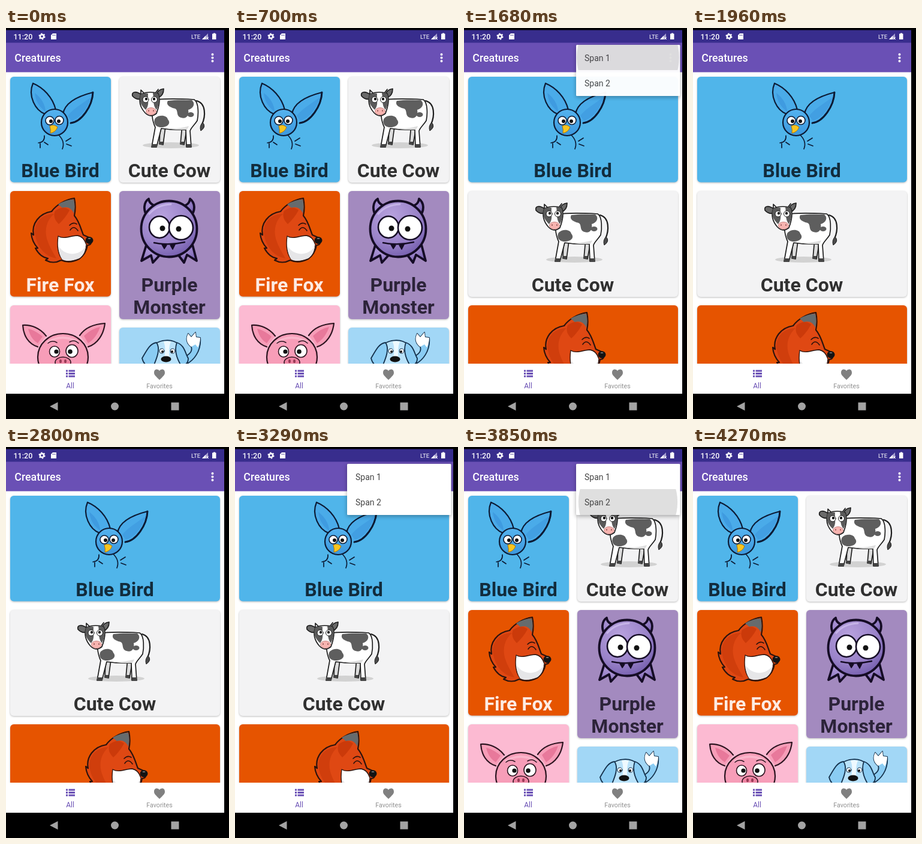
These frames come from a looping animation (372x650 px, 4.34 s). An HTML page:

```html
<!DOCTYPE html>
<html lang="en">
<head>
<meta charset="utf-8">
<style>
html, body { margin: 0; width: 100%; height: 100%; overflow: hidden; background: #000; }
svg { display: block; width: 372px; height: 650px; font-family: Roboto, sans-serif; }
.card { filter: drop-shadow(0 1px 1.5px #0004); }
.name { font-weight: 700; font-size: 32px; text-anchor: middle; }
.ink { stroke-linecap: round; stroke-linejoin: round; }
#menu { filter: drop-shadow(0 2px 3.5px #0005); font-size: 14px; fill: #444; }
</style>
</head>
<body>
<svg viewBox="0 0 372 650">
<defs>
  <clipPath id="listClip"><path d="M0 73H364V558H0z"/></clipPath>
  <clipPath id="item1"><path d="M187 28H361V70H187z"/></clipPath>
  <clipPath id="item2"><path d="M187 70H361V113H187z"/></clipPath>
  <radialGradient id="violet" cx=".38" cy=".28" r=".8"><stop stop-color="#b8a2de"/><stop offset=".6" stop-color="#9a83c9"/><stop offset="1" stop-color="#6f59aa"/></radialGradient>
  <linearGradient id="sky" x2="0" y2="1"><stop stop-color="#55b3ef"/><stop offset="1" stop-color="#3c98de"/></linearGradient>

  <g id="bird" class="ink" stroke="#0c1b35" stroke-width="2.200" fill="#4aabe9">
    <path d="M65 143C49 137 36 113 45 92C62 99 78 115 83 136"/>
    <path d="M48 108C49 122 57 133 66 139C66 128 58 115 48 108" fill="#3f9be0" stroke="none"/>
    <path d="M95 143C98 123 121 113 145 107C144 130 126 156 108 158"/>
    <path d="M103 146C110 136 125 127 142 115C136 135 123 150 109 154" fill="#429fe2" stroke="none"/>
    <path d="M145 107C144 130 126 156 108 158" fill="none" stroke-width="3"/>
    <path d="M64 179Q65 190 54 191M64 190L70 194M57 192L57 199M88 178Q99 189 94 201M100 188L108 183M101 193L109 196" fill="none" stroke-width="1.700"/>
    <circle cx="81" cy="157" r="22" fill="url(#sky)"/>
    <g stroke-width="1.600" fill="#fff"><circle cx="73" cy="154" r="7"/><circle cx="89" cy="153.500" r="7"/></g>
    <g fill="#111" stroke="none"><circle cx="75" cy="155" r="3"/><circle cx="88" cy="155" r="3"/></g>
    <path d="M73 163Q80 159 86 165Q83 173 74 175Q75 169 73 163z" fill="#f9c51d" stroke="#a87413" stroke-width="1"/>
  </g>

  <g id="cow" class="ink" stroke="#1d1d1d" stroke-width="1.700" fill="#fff">
    <ellipse cx="275" cy="195" rx="47" ry="5" fill="#d2d2d2" stroke="none"/>
    <path d="M318 121C334 125 333 147 327 160" fill="none" stroke-width="2.200"/>
    <path d="M328 157Q335 164 325 171Q322 163 328 157" fill="#4b4b4b" stroke-width="1"/>
    <path d="M257 162L256 193L262 194L266 164M294 160L291 193L297 194L302 166" fill="#ddd"/>
    <path d="M246 120C262 117 294 118 314 119C322 124 321 145 319 154C314 162 309 165 307 171L309 198L301 198L300 169Q278 170 259 167L251 198L243 198L249 165C243 153 242 136 246 120z"/>
    <path d="M259 165Q282 170 305 163Q303 169 300 169Q278 170 259 165z" fill="#dedede" stroke="none"/>
    <g fill="#5e5e5e" stroke="none">
      <path d="M270 121C284 119 299 120 310 120C317 126 312 134 304 136C306 146 300 152 292 149C283 147 288 136 282 134C274 132 266 128 270 121z"/>
      <path d="M249 150C256 143 269 145 270 152C277 160 266 166 257 165C248 164 245 156 249 150z"/>
      <ellipse cx="308" cy="144" rx="5.500" ry="4"/>
      <path d="M243 193h9v5h-9zM301 193h8v5h-8zM256 189h6v5h-6zM291 189h6v5h-6z" fill="#444"/>
    </g>
    <path d="M226 111C217 104 209 106 211 113Q217 120 226 118zM251 110Q254 102 263 101Q263 113 253 116z" fill="#6a6a6a"/>
    <path d="M225 110Q239 104 254 109C259 120 254 134 251 142Q241 150 232 141C224 132 221 121 225 110z"/>
    <path d="M225 110Q232 107 237 109C236 119 240 127 233 136C224 128 221 119 225 110zM245 108Q251 107 254 110C258 120 254 130 251 136C244 127 247 119 245 108z" fill="#5a5a5a" stroke="none"/>
    <path d="M225 109L225 103L230 108M250 107L254 102" fill="none"/>
    <g stroke-width="1"><circle cx="233" cy="119" r="5"/><circle cx="247.500" cy="119" r="5"/></g>
    <g fill="#111" stroke="none"><circle cx="234" cy="118" r="2.200"/><circle cx="247" cy="118" r="2.200"/></g>
    <ellipse cx="242" cy="138.500" rx="8.500" ry="6" fill="#f7b4b0" stroke="#c98a88" stroke-width="1"/>
    <path d="M238 137v1M246 137v1" stroke="#8a4e4c"/>
  </g>

  <g id="fox" class="ink" stroke="#2b130d" stroke-width="2.200">
    <path d="M76 305C84 294 99 285 114 283C116 293 116 303 114 312C122 321 125 334 129 344L138 348C145 353 143 361 136 361C134 372 129 379 122 384C110 390 99 389 92 386Q79 393 66 386L70 383Q57 381 49 366L53 366Q43 355 42 341L46 344C42 325 56 308 76 305z" fill="#df4813"/>
    <path d="M48 342C47 323 60 309 80 309C68 320 64 334 68 350C73 366 79 373 84 383C65 380 52 364 48 342z" fill="#d03e0c" stroke="none"/>
    <path d="M87 293Q101 285 113 285Q116 297 113 308Q107 295 94 299z" fill="#666b6d" stroke="none"/>
    <path d="M82 304Q96 294 106 303Q99 316 88 326Q77 315 82 304z" fill="#cb3a0a" stroke="none"/>
    <path d="M87 346C97 352 108 345 119 345C127 346 131 351 134 360C133 371 129 379 122 383C110 388 100 388 94 385C86 375 85 360 87 346z" fill="#fff" stroke-width="1.300"/>
    <path d="M88 363C98 379 122 380 133 363C132 373 128 379 122 383C110 388 100 388 94 385Q88 377 88 363z" fill="#e6e6e8" stroke="none"/>
    <path d="M107 336Q113 327 120 337M106 328Q112 322 118 326" fill="none" stroke-width="1.600"/>
    <ellipse cx="139" cy="353" rx="6.500" ry="6" fill="#131313" stroke="none"/>
    <ellipse cx="139" cy="350" rx="2.500" ry="1" fill="#777" stroke="none"/>
  </g>

  <g id="monster" class="ink" stroke="#150c25" stroke-width="3.800" fill="url(#violet)">
    <path d="M234 361L226 387L242 378L245 390L256 378M288 378L297 390L302 377L318 387L311 360"/>
    <path d="M236 313C228 303 230 289 238 284C239 293 247 296 256 297zM288 297C298 297 306 293 307 284C315 290 317 303 308 313z"/>
    <circle cx="272" cy="334" r="46.500"/>
    <path d="M239 309Q252 294 275 293" fill="none" stroke="#c6b4e8" stroke-width="3"/>
    <g fill="#fff" stroke-width="2.600"><ellipse cx="256" cy="331" rx="17" ry="18"/><circle cx="292" cy="332" r="20"/></g>
    <g fill="#111" stroke="none"><circle cx="261" cy="333" r="4.500"/><circle cx="288" cy="334" r="4.500"/></g>
    <path d="M247 357Q272 362 298 356" fill="none" stroke-width="2.400"/>
    <path d="M260 360L264 367L268 361zM274 361L278 368L282 360z" fill="#150c25" stroke-width="1.500"/>
  </g>

  <g id="pig" class="ink" stroke="#2c1420" stroke-width="2.200" fill="#f79db8">
    <path d="M67 512C57 499 42 493 28 494C29 511 37 525 53 530M123 511C132 498 148 492 165 491C163 509 153 525 137 530"/>
    <path d="M61 513Q48 502 37 500Q41 517 53 524zM130 512Q142 500 157 497Q151 515 137 524z" fill="#e8799b" stroke="none"/>
    <ellipse cx="95" cy="547" rx="42" ry="39"/>
    <path d="M70 522Q93 508 119 521" fill="none" stroke="#fbb6cb" stroke-width="4"/>
    <path d="M70 524Q77 518 85 523M106 522Q114 517 121 524" fill="none" stroke-width="1.500"/>
    <g fill="#fff" stroke-width="1.600"><ellipse cx="81" cy="538" rx="8.500" ry="9"/><ellipse cx="110" cy="537" rx="10" ry="10.500"/></g>
    <g fill="#111" stroke="none"><circle cx="84" cy="538" r="3.600"/><circle cx="107" cy="538" r="3.800"/></g>
    <ellipse cx="95" cy="556" rx="13" ry="9" fill="#ee84a2" stroke-width="1.600"/>
    <g fill="#983b57" stroke="none"><ellipse cx="91" cy="554" rx="2" ry="3"/><ellipse cx="99" cy="554" rx="2" ry="3"/></g>
  </g>

  <g id="dog" class="ink" stroke="#14304b" stroke-width="1.800" fill="#8accf3">
    <path d="M291 548C303 546 312 539 309 530C302 525 299 517 304 508L309 514L316 506L317 514L324 515C326 535 315 555 293 562"/>
    <path d="M309 530C302 525 299 517 304 508L309 514L316 506L317 514L324 515Q324 523 320 531L316 526z" fill="#fff" stroke="none"/>
    <path d="M249 525C261 517 279 517 288 526L293 565H242z" fill="#b9e2fa"/>
    <path d="M251 523C239 525 235 536 227 549Q231 565 246 562C252 548 258 533 251 523zM285 523C298 527 299 541 304 549Q304 561 292 561C284 548 281 534 285 523z"/>
    <path d="M263 521Q268 534 263 552H273Q270 534 275 521z" fill="#eef9ff" stroke="none"/>
    <g fill="#fff" stroke-width="1"><circle cx="260" cy="537" r="4"/><circle cx="278" cy="537" r="4"/></g>
    <g fill="#111" stroke="none"><circle cx="261" cy="538" r="2"/><circle cx="277" cy="538" r="2"/><ellipse cx="267" cy="550.500" rx="8.500" ry="5"/></g>
  </g>
</defs>

<path d="M0 4H364V608H0z" fill="#fff"/>
<g id="list" clip-path="url(#listClip)"></g>

<path d="M0 3.500H364V25H0z" fill="#382d8d"/>
<path d="M0 24.500H364V73.500H0z" fill="#6a50b5"/>
<g fill="#fff">
  <text x="12.500" y="18.700" font-size="12.500" font-weight="500">11:20</text>
  <circle cx="60" cy="14" r="3.100" fill="none" stroke="#fff" stroke-width="2.500"/>
  <circle cx="60" cy="14" r="4.800" fill="none" stroke="#fff" stroke-width="1.500" stroke-dasharray="2.500 2.527"/>
  <path d="M78 9H84V19H75V12z"/>
  <path d="M78 11v2M80 11v2M82 11v2" stroke="#382d8d" stroke-width=".8"/>
  <text x="309" y="17.500" font-size="9.800">LTE</text>
  <path d="M327 19L337 9V19z" fill="#a7a0d0"/><path d="M327 19L333 13V19z"/>
  <path d="M334 15l4 4m0-4l-4 4" stroke="#fff"/>
  <path d="M346 8.500h3v1h1.500v9.500h-6.500v-9.500h2z"/>
  <text x="14.300" y="56" font-size="17.800" font-weight="500">Creatures</text>
  <circle cx="344.500" cy="44" r="2"/><circle cx="344.500" cy="49.500" r="2"/><circle cx="344.500" cy="55" r="2"/>
</g>

<path d="M0 558H364V608H0z" fill="#fff"/>
<path d="M100 568.500h3v3h-3zm4.500 0H115v3h-10.500zM100 573h3v3h-3zm4.500 0H115v3h-10.500zM100 577.500h3v3h-3zm4.500 0H115v3h-10.500z" fill="#6a50b5"/>
<path d="M256 585C250 579 247 577 247 573C247 567 253 566 256 570C259 566 265 567 265 573C265 577 262 579 256 585z" fill="#808080"/>
<g text-anchor="middle">
  <text x="107" y="599" font-size="12" fill="#6d54b6">All</text>
  <text x="256" y="599" font-size="10.700" fill="#919191">Favorites</text>
</g>
<g fill="#a3a3a3"><path d="M73 629L86.500 622V636z"/><circle cx="181.500" cy="629" r="6.500"/><path d="M275.500 622.500h13v13h-13z"/></g>

<g id="menu">
  <rect x="187" y="28" width="173.500" height="85" rx="1.500" fill="#fff"/>
  <circle id="ripple" cx="273.500" fill="#dfdfdf"/>
  <text x="201" y="54.500">Span 1</text><text x="201" y="97">Span 2</text>
</g>
</svg>

<script>
const LOOP = 4340, STEP = 70;
const $ = id => document.getElementById(id);
const clamp = x => Math.max(0, Math.min(1, x));
const easeOut = x => 1 - (1 - clamp(x)) ** 2;

// id, label lines, card colour, text colour, x, y, height
const creatures = [
  ['bird', ['Blue Bird'], '#50b5ea', '#122c3d', 7, 81, 175.5],
  ['cow', ['Cute Cow'], '#f3f3f4', '#303030', 189, 81, 176],
  ['fox', ['Fire Fox'], '#e65400', '#fdebe3', 7, 271, 175.5],
  ['monster', ['Purple', 'Monster'], '#a38abf', '#2c2339', 189, 271, 213],
  ['pig', [], '#fcbad2', '#333', 7, 461, 176],
  ['dog', [], '#a2d7f6', '#333', 189, 498, 176]
];

function card([id, lines, fill, ink, x, y, h], newY) {
  const single = newY !== undefined;
  const top = single ? newY : y, left = single ? 7 : x, width = single ? 350 : 168;
  const mid = left + width / 2;
  const labels = lines.map((s, i) =>
    `<text class="name" x="${mid - .5}" y="${top + 166.5 + i * 37.5}" fill="${ink}">${s}</text>`);
  return `<rect class="card" x="${left}" y="${top}" width="${width}" height="${h}" rx="6" fill="${fill}"/>
    <use href="#${id}" x="${mid - x - 84}" y="${top - y}"/>${labels.join('')}`;
}

$('list').innerHTML =
  `<g id="grid">${creatures.map(c => card(c)).join('')}</g>
   <g id="column">${creatures.slice(0, 3).map((c, i) => card(c, 81 + i * 190)).join('')}</g>`;

const visits = [
  { open: 840, press: 1500, close: 1675, item: 1 },
  { open: 2870, press: 3685, close: 3870, item: 2 }
];

function draw(now) {
  const t = Math.floor(now % LOOP / STEP) * STEP;
  const single = t >= 1680 && t < 3850;
  $('grid').style.display = single ? 'none' : '';
  $('column').style.display = single ? '' : 'none';

  const v = visits[t < 2200 ? 0 : 1];
  const shown = clamp((t - v.open + STEP) / 200) * (1 - clamp((t - v.close) / 150));
  const grow = .75 + .25 * easeOut((t - v.open + STEP) / 200);
  $('menu').style.display = shown ? '' : 'none';
  $('menu').setAttribute('opacity', shown);
  $('menu').setAttribute('transform', `translate(361 28) scale(${grow}) translate(-361 -28)`);
  $('ripple').setAttribute('cy', v.item === 1 ? 49 : 91.5);
  $('ripple').setAttribute('r', 89 * easeOut((t - v.press) / 225));
  $('ripple').setAttribute('clip-path', `url(#item${v.item})`);
}

const start = performance.now();
function tick() {
  draw(performance.now() - start);
  requestAnimationFrame(tick);
}
tick();
</script>
</body>
</html>
```
